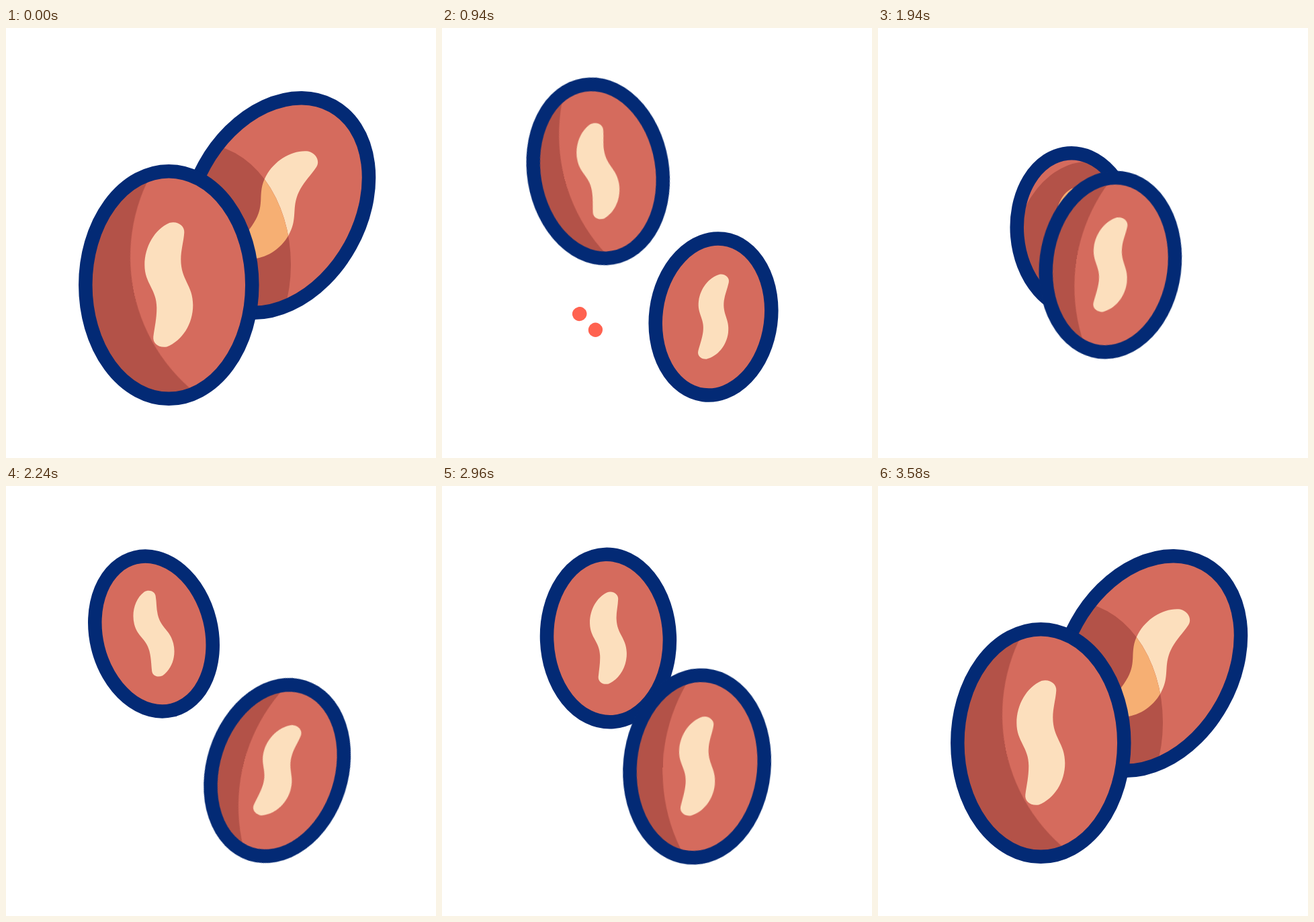
An HTML page without scripts for the animation above (3.6 s loop, 640 px wide and 640 px high).

```html
<!DOCTYPE html>
<html lang="en">
<head>
<meta charset="utf-8">
<title>Two beans</title>
<style>
html, body { margin: 0; width: 100%; height: 100%; overflow: hidden; background: #fff; }
svg { display: block; width: 100%; height: 100%; }

.body { fill: #d56b5d; }
.dark { fill: #b35248; }
.seed { fill: #fcdfbd; }
.seed-dark { fill: #f6af73; }
.rim { fill: none; stroke: #032a75; stroke-width: 20.5px; vector-effect: non-scaling-stroke; }
.spark { fill: none; stroke: #ff6250; stroke-width: 21px; stroke-linecap: round; opacity: 0; }

.front, .back, .cast, .follow, .light, .spark {
  animation-duration: 3.6s;
  animation-iteration-count: infinite;
  animation-timing-function: ease-in-out;
}
.front { animation-name: front-move, front-tilt, front-size; }
.back { animation-name: back-move, back-tilt, back-size; }
.cast { animation-name: cast-move, front-tilt, front-size; }
.follow { animation-name: front-move, front-tilt; }
.light { animation-name: light-turn; }
.first { animation-name: first-burst; }
.second { animation-name: second-burst; }

@keyframes front-move {
  0%, 5.83%, 94.44%, 100% { translate: 242.3px 382.5px; }
  22.78%, 43.89% { translate: 232.3px 213.3px; }
  60.7%, 77.78% { translate: 403.7px 423.5px; }
}
@keyframes front-size {
  0%, 5.83%, 94.44%, 100% { scale: 1; }
  22.78%, 77.78% { scale: .77; }
}
@keyframes front-tilt {
  0%, 5.83%, 23.33%, 37.22%, 95.56%, 100% { rotate: 0deg; }
  30.28% { rotate: -28deg; }
  43.89% { rotate: -25deg; }
  53.89% { rotate: 7.4deg; }
  58.89%, 77.78% { rotate: 3deg; }
  65.83% { rotate: 34deg; }
  72.78% { rotate: 15deg; }
  89.44% { rotate: 11.5deg; }
}

@keyframes back-move {
  0%, 5.83%, 94.44%, 100% { translate: 404px 264px; }
  22.78%, 44.72% { translate: 404px 430px; }
  61.1%, 77.78% { translate: 220px 220px; }
}
@keyframes back-size {
  0%, 5.83%, 94.44%, 100% { scale: 1; }
  22.78%, 77.78% { scale: .691; }
}
@keyframes back-tilt {
  0%, 5.83%, 95.56%, 100% { rotate: 29deg; }
  24%, 37.22%, 58.89%, 77.78% { rotate: 0deg; }
  30.28% { rotate: 31deg; }
  44.17% { rotate: 28deg; }
  53.89% { rotate: -5deg; }
  65.83% { rotate: -29deg; }
  72.78% { rotate: 4deg; }
  89.44% { rotate: -7.3deg; }
}

/* shadow of the front bean, leaning towards the back one */
@keyframes cast-move {
  0%, 5.83%, 94.44%, 100% { translate: 290px 352px; }
  22.78% { translate: 280px 183px; }
  43.89% { translate: 133px 190px; }
  60.7% { translate: 392px 411px; }
  77.78% { translate: 452px 393px; }
}
@keyframes light-turn {
  0%, 5.83%, 95.56%, 100% { transform: rotate(-11.7deg) translateX(207px); }
  26.11% { transform: rotate(-5.6deg) translateX(209px); }
  44.44% { transform: rotate(-20deg) translateX(209px); }
  53.89% { transform: rotate(1.5deg) translateX(209px); }
  72.78% { transform: rotate(-9.7deg) translateX(209px); }
  89.44% { transform: rotate(.5deg) translateX(209px); }
}

@keyframes first-burst {
  0%, 26.04% { opacity: 0; stroke-dasharray: 0 9; stroke-dashoffset: 0; }
  26.05% { opacity: 1; stroke-dasharray: 0 9; stroke-dashoffset: 0; animation-timing-function: ease-out; }
  34% { opacity: 1; stroke-dasharray: 1 9; stroke-dashoffset: 0; }
  39.7% { opacity: 1; stroke-dasharray: 0 9; stroke-dashoffset: -.99; }
  39.71%, 100% { opacity: 0; stroke-dasharray: 0 9; stroke-dashoffset: -.99; }
}
@keyframes second-burst {
  0%, 84.9% { opacity: 0; stroke-dasharray: 0 9; stroke-dashoffset: 0; }
  84.91% { opacity: 1; stroke-dasharray: 0 9; stroke-dashoffset: 0; animation-timing-function: ease-out; }
  94% { opacity: 1; stroke-dasharray: 1 9; stroke-dashoffset: 0; }
  99% { opacity: 1; stroke-dasharray: 0 9; stroke-dashoffset: -.99; }
  99.01%, 100% { opacity: 0; stroke-dasharray: 0 9; stroke-dashoffset: -.99; }
}
</style>
</head>
<body>
<svg viewBox="0 0 640 640" aria-label="Two beans swapping places">
  <defs>
    <ellipse id="bean" rx="124" ry="169.3"/>
    <path id="mark" transform="translate(-242 -382)" d="M243 289.5C255 286 266 294 265 304C264 318 260 330 260 344C260 375 278 382 278 412C278 440 262 465 239 474C227 476 218 469 219 459C221 444 224 432 224 416C224 388 206 380 206 352C206 325 221 299 243 289.5Z"/>
    <clipPath id="inside"><ellipse class="front" rx="124" ry="169.3"/></clipPath>
    <clipPath id="shadow"><ellipse class="cast" rx="134" ry="179.5"/></clipPath>
  </defs>

  <g class="back">
    <use href="#bean" class="body"/>
    <use href="#mark" class="seed"/>
  </g>
  <g clip-path="url(#shadow)">
    <g class="back">
      <use href="#bean" class="dark"/>
      <use href="#mark" class="seed-dark"/>
    </g>
  </g>
  <g class="back"><ellipse class="rim" rx="124" ry="169.3"/></g>

  <g class="front"><use href="#bean" class="dark"/></g>
  <!-- the light keeps its size while the bean shrinks -->
  <g clip-path="url(#inside)">
    <g class="follow"><circle class="body light" r="260"/></g>
  </g>
  <g class="front">
    <use href="#mark" class="seed"/>
    <ellipse class="rim" rx="124" ry="169.3"/>
  </g>

  <path class="spark first" pathLength="1" d="M205 425.5L176 432"/>
  <path class="spark first" pathLength="1" d="M228.5 449L218.5 476"/>
  <path class="spark second" pathLength="1" d="M429 469.3L458 475.5"/>
  <path class="spark second" pathLength="1" d="M408.5 496L418.5 523.5"/>
</svg>
</body>
</html>
```
